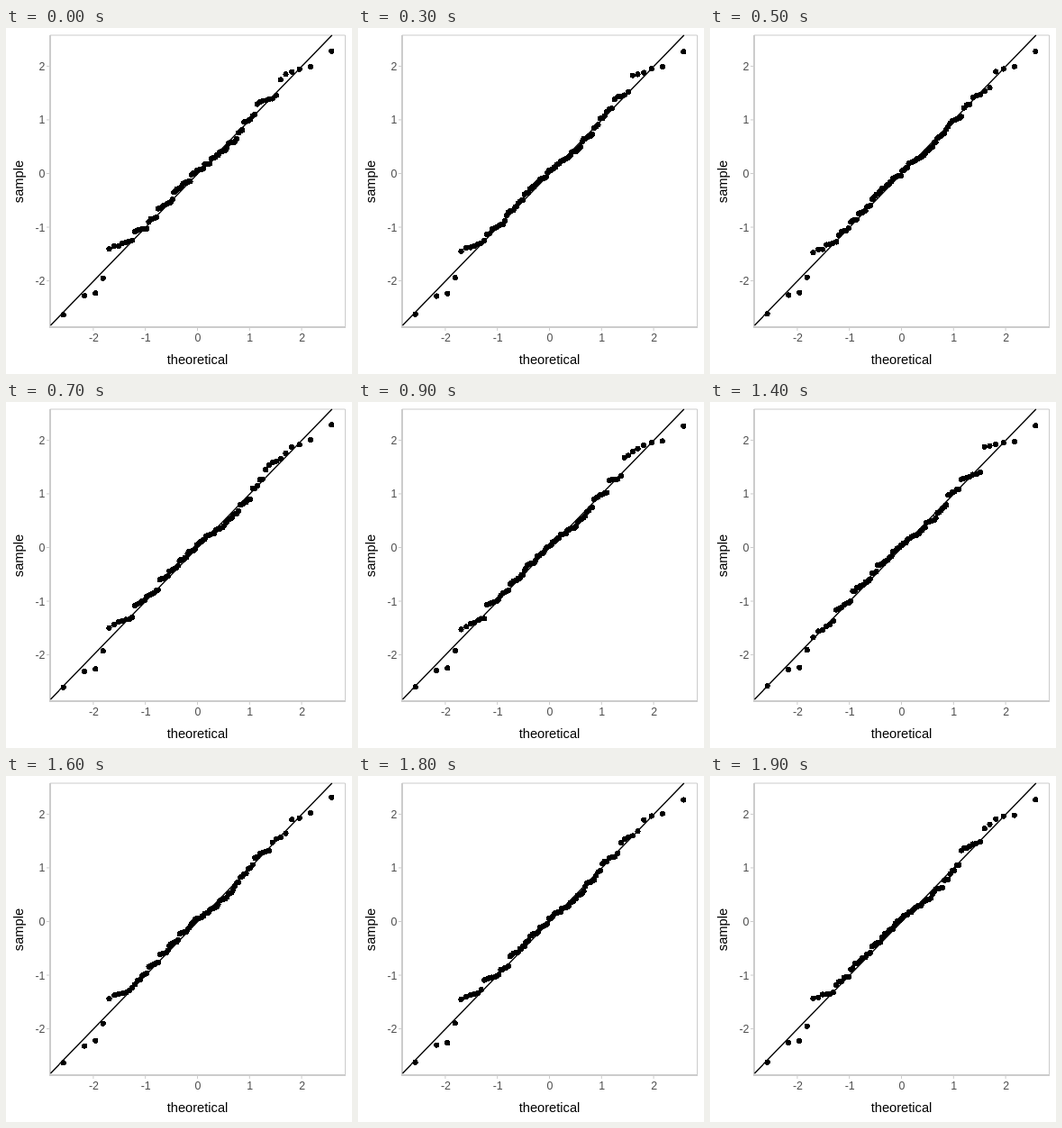
Write an HTML page that moves like this. It is 384 px wide and 384 px high and loops after 2000 ms.

```html
<!DOCTYPE html>
<html lang="en">
<head>
<meta charset="utf-8">
<title>Normal Q-Q plot</title>
<style>
html, body { margin: 0; width: 100%; height: 100%; overflow: hidden; background: #fff; }
svg { display: block; width: 384px; height: 384px; }
text { font: 12.4px "Liberation Sans", Arial, sans-serif; fill: #4d4d4d; text-anchor: middle; }
.left { text-anchor: end; }
.title { font-size: 14.67px; fill: #000; }
.axis { fill: none; stroke: #ccc; }
#dots { shape-rendering: crispEdges; }
</style>
</head>
<body>
<svg viewBox="0 0 384 384">
  <path class="axis" d="M49 8H376.5V332"/>
  <path class="axis" d="M49 8V332H377" stroke-width="2"/>
  <g id="ticks"></g>
  <path d="M49.5 329.9L361.8 8" stroke="#000" stroke-width="1.4"/>
  <g id="dots"></g>
  <text class="title" x="212.5" y="373">theoretical</text>
  <text class="title" transform="translate(19 170.5) rotate(-90)">sample</text>
</svg>
<script>
const COUNT = 100, STEP = 100, STEPS = 20, TAIL = 4;
const xAt = z => 212.5 + 57.8 * z;
const yAt = z => 161.5 - 59.55 * z;

// Typical sample value at a few theoretical quantiles.
const trend = [
  [-2.58, -2.61], [-2.17, -2.29], [-1.96, -2.24], [-1.81, -1.92], [-1.51, -1.44],
  [-1.02, -0.98], [-0.21, -0.15], [0.01, 0.06], [0.48, 0.4], [0.72, 0.63],
  [1.2, 1.26], [1.44, 1.47], [1.7, 1.86], [2.17, 2], [2.58, 2.29]
];

function typical(z) {
  const found = trend.findIndex(([x]) => x >= z);
  const end = found < 0 ? trend.length - 1 : Math.max(1, found);
  const [x0, y0] = trend[end - 1], [x1, y1] = trend[end];
  return y0 + (y1 - y0) * (z - x0) / (x1 - x0);
}

// Normal quantile by Newton steps on a series for the distribution function.
function quantile(p) {
  let z = 0;
  for (let n = 0; n < 12; n++) {
    let term = z, sum = z;
    for (let k = 1; k < 60; k++) sum += term *= z * z / (2 * k + 1);
    const density = Math.exp(-z * z / 2) / Math.sqrt(2 * Math.PI);
    z -= (0.5 + density * sum - p) / density;
  }
  return z;
}

const zAt = rank => quantile((rank + 0.5) / COUNT);

function seeded(seed) {
  return () => (seed = (seed * 16807) % 2147483647) / 2147483647;
}

// Short runs of neighbouring values crowd together, which makes small stairs.
function drawSample(step) {
  const random = seeded(7919 * (step + 1));
  const values = [];
  while (values.length < COUNT) {
    const start = values.length;
    const inTail = start < TAIL || start >= COUNT - TAIL;
    const length = inTail ? 1 : Math.min(2 + Math.floor(random() * 6), COUNT - TAIL - start);
    const middle = start + (length - 1) / 2;
    const shift = inTail ? 0 : (random() - 0.5) * 2;
    for (let i = start; i < start + length; i++) {
      const rank = middle + shift + (i - middle) * 0.45;
      values.push(typical(zAt(rank)) + (random() - 0.5) * 0.06);
    }
  }
  return values.sort((a, b) => a - b);
}

const samples = Array.from({ length: STEPS }, (_, step) => drawSample(step));

function add(parent, tag, attributes, content = "") {
  const node = document.createElementNS("http://www.w3.org/2000/svg", tag);
  for (const name in attributes) node.setAttribute(name, attributes[name]);
  node.textContent = content;
  return parent.appendChild(node);
}

const ticks = document.getElementById("ticks");
for (let v = -2; v <= 2; v++) {
  const x = xAt(v), y = yAt(v);
  add(ticks, "path", { class: "axis", d: `M${x} 332v4M49 ${y}h-4` });
  add(ticks, "text", { x: x + 0.5, y: 348 }, v);
  add(ticks, "text", { class: "left", x: 43.5, y: y + 4.5 }, v);
}

const dotLayer = document.getElementById("dots");
const dots = Array.from({ length: COUNT }, (_, i) =>
  add(dotLayer, "circle", { cx: xAt(zAt(i)), r: 3.1 }));

let shown = -1;
function render(now) {
  const step = Math.floor(now / STEP) % STEPS;
  if (step !== shown) {
    dots.forEach((dot, i) => dot.setAttribute("cy", yAt(samples[step][i])));
    shown = step;
  }
  requestAnimationFrame(render);
}
render(performance.now());
</script>
</body>
</html>
```
